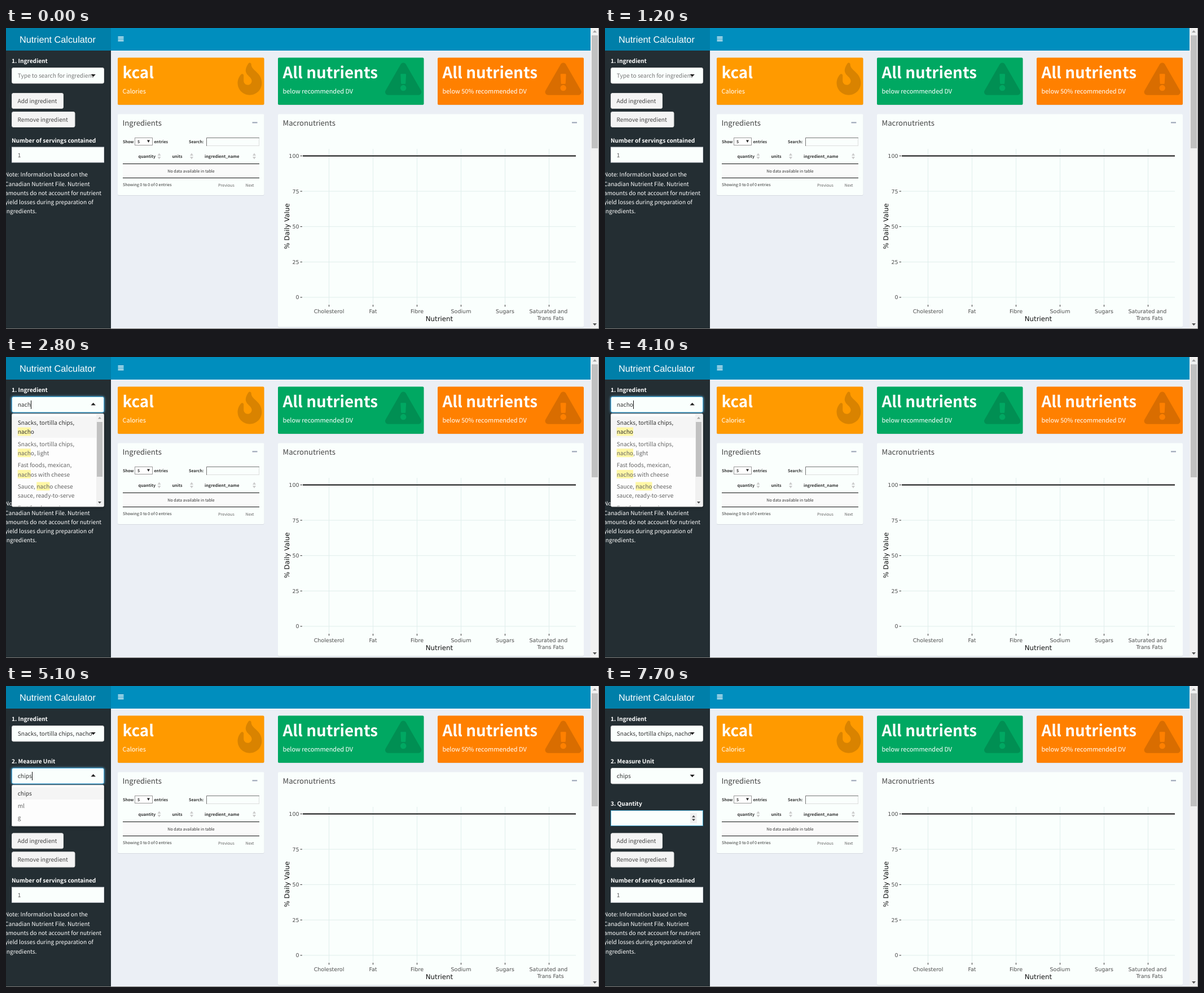
These frames come from a looping animation (1051x533 px, 8 s). An HTML page:

```html
<!DOCTYPE html>
<html lang="en">
<head>
<meta charset="utf-8">
<title>Nutrient Calculator</title>
<style>
  html, body { margin: 0; width: 100%; height: 100%; overflow: hidden; background: #ebeff5; }
  svg { display: block; width: 1051px; height: 533px; }
  text {
    font-family: "Noto Sans CJK SC", "Noto Sans CJK JP", "Noto Sans CJK", Lato, sans-serif;
    white-space: pre; text-rendering: geometricPrecision;
  }
  .plot { font-family: "DejaVu Sans", sans-serif; }
  .brand { font-family: "Liberation Sans", Arial, sans-serif; }
  .glow { filter: drop-shadow(0 0 2px #5bb8e8); }
  .drop { filter: drop-shadow(0 2px 2px rgba(0, 0, 0, .3)); }
</style>
</head>
<body>
<svg id="stage" viewBox="0 0 1051 533">
  <defs>
    <clipPath id="field"><rect x="11" y="60" width="146.500" height="130"/></clipPath>
    <clipPath id="menu"><rect x="10" y="100" width="150" height="164.500"/></clipPath>
  </defs>
  <g id="page"></g>
  <g id="side"></g>
</svg>
<script>
const LOOP = 8000;
const BODY = 10.15;   // sidebar text size
const SMALL = 7.1;    // table text size
const FACE = '"Noto Sans CJK SC", "Noto Sans CJK JP", "Noto Sans CJK", Lato, sans-serif';
const WHITE = '#fafffd';

const pen = document.createElement('canvas').getContext('2d');
pen.font = `${BODY}px ${FACE}`;
pen.textRendering = 'geometricPrecision';
const widthOf = s => pen.measureText(s).width;

const rect = (x, y, w, h, fill, more = '') =>
  `<rect x="${x}" y="${y}" width="${w}" height="${h}" fill="${fill}" ${more}/>`;
const text = (x, y, s, size, fill, more = '') =>
  `<text x="${x}" y="${y}" font-size="${size}" fill="${fill}" ${more}>${s}</text>`;
const line = (x1, y1, x2, y2, stroke, w = 1) =>
  `<path d="M${x1} ${y1}L${x2} ${y2}" stroke="${stroke}" stroke-width="${w}"/>`;
// Triangle centred on x; h < 0 points up from y.
const tri = (x, y, half, h, fill) =>
  `<path d="M${x - half} ${y}h${2 * half}L${x} ${y + h}z" fill="${fill}"/>`;
const BOLD = 'font-weight="700"';
const MID = 'text-anchor="middle"';

const FIRE = 'M216 23.860c0-23.800-30.650-32.770-44.150-13.040C48 191.850 224 200 224 288c0 35.630-29.110 64.460-64.850 64-35.170-.450-63.150-29.770-63.150-65v-85.500c0-21.700-26.470-32.230-41.430-16.500C27.800 213.160 0 261.330 0 320c0 105.870 86.130 192 192 192s192-86.130 192-192c0-170.290-168-193-168-296.140z';
const ALERT = 'M569.500 440C588 472 564.800 512 528 512H48c-37 0-60-40-41.500-72L246.400 24c18.500-32 64.700-32 83.200 0zM288 354c-25.400 0-46 20.600-46 46s20.600 46 46 46 46-20.600 46-46-20.600-46-46-46zm-43.700-165.300l7.400 136c.400 6.300 5.600 11.300 12 11.300h48.600c6.400 0 11.600-5 12-11.300l7.400-136c.400-6.900-5.100-12.700-12-12.700h-63.400c-6.900 0-12.400 5.800-12 12.700z';

function valueBox(x, w, fill, title, note, icon, iconX) {
  return rect(x, 53, w, 83.500, 'rgba(0,0,0,.12)', 'rx="2"') + rect(x, 52.500, w, 83.500, fill, 'rx="2"') +
    `<path d="${icon}" transform="translate(${iconX} 61.500) scale(.1118)" fill-opacity=".15"/>` +
    text(x + 8.500, 89, title, 27.800, '#fff', BOLD) +
    text(x + 8.500, 115.500, note, 10.950, '#fff');
}

function panel(x, w, h, title) {
  return rect(x, 153.500, w, h, '#d6dbe1', 'rx="2"') + rect(x, 152.500, w, h, WHITE, 'rx="2"') +
    text(x + 8.500, 173, title, 13.100, '#444') +
    rect(x + w - 21, 166.500, 9, 2, '#97a0b3');
}

function table() {
  const head = [['quantity', 234.500, 271.500], ['units', 294.500, 329], ['ingredient_name', 352, 440]];
  const small = (x, y, s, more) => text(x, y, s, SMALL, '#333', more);
  return small(207, 203.500, 'Show', BOLD) + small(262.500, 203.500, 'entries', BOLD) +
    rect(228.500, 194.500, 31, 13, '#fff', 'stroke="#999"') +
    small(233, 203.700, '5', BOLD) + tri(252.500, 198.500, 2.500, 4.500, '#222') +
    small(324, 204, 'Search:', BOLD) +
    rect(355.500, 194.500, 93, 14, WHITE, 'stroke="#ddd"') +
    `<path d="M355.500 209V194.500H449" fill="none" stroke="#777"/>` +
    head.map(([s, x, mark]) => text(x, 229.500, s, 7.250, '#333', BOLD) +
      tri(mark, 226, 3, -4.500, '#ccc') + tri(mark, 228, 3, 4.500, '#ccc')).join('') +
    rect(207, 241, 242, 24, '#fafafa') +
    line(207, 240.500, 449, 240.500, '#111') + line(207, 265.500, 449, 265.500, '#111') +
    small(328, 256, 'No data available in table', MID) +
    small(207, 279.500, 'Showing 0 to 0 of 0 entries') +
    text(376, 280.500, 'Previous', SMALL, '#666') + text(424.500, 280.500, 'Next', SMALL, '#666');
}

function chart() {
  const names = ['Cholesterol', 'Fat', 'Fibre', 'Sodium', 'Sugars', 'Saturated and'];
  let out = '';
  const label = (x, y, s, more) => text(x, y, s, 9.500, '#4d4d4d', `class="plot" ${more}`);
  for (let i = 0; i < 5; i++) {
    const y = 226.500 + i * 62.600;
    out += line(526, y, 1010, y, '#e0eeec') + line(521.500, y, 525, y, '#333') +
      label(519.500, y + 3.500, 100 - 25 * i, 'text-anchor="end"');
  }
  names.forEach((s, i) => {
    const x = 572.500 + 78 * i;
    out += line(x, 214, x, 489, '#e0eeec') + line(x, 490, x, 493.500, '#333') +
      label(i === 5 ? 961.500 : x, 505, s, MID);
  });
  return out + label(965, 517, 'Trans Fats', MID) + line(526, 226.500, 1010, 226.500, '#111', 2) +
    text(768, 519, 'Nutrient', 11.800, '#111', `class="plot" ${MID}`) +
    text(0, 0, '% Daily Value', 11.800, '#111', `class="plot" ${MID} transform="translate(502 351) rotate(-90)"`);
}

function page() {
  return rect(0, 0, 1051, 533, '#ebeff5') + rect(186, 0, 850, 40, '#008ebe') +
    [16, 19.200, 22.400].map(y => rect(198.500, y - .7, 10, 1.700, '#fff')).join('') +
    valueBox(198, 259.500, '#ff9a00', 'kcal', 'Calories', FIRE, 410.500) +
    valueBox(482, 258.500, '#00a862', 'All nutrients', 'below recommended DV', ALERT, 672) +
    valueBox(765, 259, '#ff8000', 'All nutrients', 'below 50% recommended DV', ALERT, 955.500) +
    panel(198, 259.500, 143.500, 'Ingredients') + table() +
    panel(482, 542, 377, 'Macronutrients') + chart() +
    rect(1036, 0, 15, 533, '#f1f1f1') + rect(1038, 13, 11, 200, '#c1c1c1') +
    tri(1043.500, 8, 3.500, -4, '#a3a3a3') + tri(1043.500, 523, 3.500, 4, '#505050') +
    rect(1050, 0, 1, 533, '#9a9a9a') + rect(0, 532, 1051, 1, '#7d7b78');
}

const FOODS = [['Cheese souffle'], ['Chop suey, with meat,', 'canned'],
  ['Chinese dish, chow mein,', 'chicken'], ['Corn fritter'],
  ['Beef pot roast, with', 'browned potatoes, peas', 'and gravy']];
const MATCHES = [['Snacks, tortilla chips,', 'nacho'], ['Snacks, tortilla chips,', 'nacho, light'],
  ['Fast foods, mexican,', 'nachos with cheese'], ['Sauce, nacho cheese', 'sauce, ready-to-serve'],
  ['Fast foods, mexican,', 'nachos with cheese']];
const NOTE = ['Note: Information based on the', 'Canadian Nutrient File. Nutrient',
  'amounts do not account for nutrient', 'yield losses during preparation of', 'ingredients.'];
const HINT = 'Type to search for ingredient';
const CHOICE = 'Snacks, tortilla chips, nacho';

const label = (y, s) => text(10, y, s, BODY, '#fff', BOLD);
const caretBar = (s, y) => rect(Math.round(20.400 + widthOf(s)), y, 1, 15, '#111');

function button(y, s, w, hot) {
  return rect(10.500, y + .5, w, 27, hot ? '#e7e7e7' : '#f4f4f4', `rx="2.500" stroke="${hot ? '#adadad' : '#ddd'}"`) +
    text(20.500, y + 18, s, BODY, '#444');
}

function picker(y, s, open, hint) {
  const frame = open ? 'class="glow" stroke="#4aaee0"' : 'stroke="#ddd"';
  return rect(10.500, y + .5, 163, 27.500, WHITE, `rx="2.500" ${frame}`) +
    `<g clip-path="url(#field)">${text(20.700, y + 18, s, BODY, hint ? '#777' : '#333')}</g>` +
    (open ? tri(154.700, y + 15.500, 4.200, -4.500, '#222') : tri(154.700, y + 12, 4.200, 4.500, '#222'));
}

function marks(s, query, y) {
  let out = '';
  if (query.length < 2) return out;
  for (let at = s.indexOf(query); at >= 0; at = s.indexOf(query, at + 1))
    out += rect(20.700 + widthOf(s.slice(0, at)), y - 11.500, widthOf(query), 15, '#fff7a5');
  return out;
}

function foodMenu(query) {
  const found = query.length > 1;
  let y = 105.200, items = '';
  (found ? MATCHES : FOODS).forEach((rows, i) => {
    const h = 5.100 + 16.300 * rows.length;
    if (!i) items += rect(11, y, 149, h, '#f5f5f5');
    rows.forEach((s, n) => {
      const base = y + 14.600 + 16.300 * n;
      items += marks(s, query, base) + text(20.700, base, s, BODY, i ? '#666' : '#333');
    });
    y += h;
  });
  return rect(10.500, 100.500, 163, 164.500, '#fdfdfd', 'rx="2" stroke="#d0d0d0" class="drop"') +
    `<g clip-path="url(#menu)">${items}</g>` +
    rect(160, 101, 13, 164, '#f1f1f1') + rect(161, 115, 10, found ? 97 : 14, '#c1c1c1') +
    tri(166, 109.500, 3, -3.500, '#a3a3a3') + tri(166, 256, 3, 3.500, '#505050');
}

function unitMenu(active) {
  return rect(10.500, 175.500, 163, 72.500, '#fdfdfd', 'rx="2" stroke="#d0d0d0" class="drop"') +
    ['chips', 'ml', 'g'].map((s, i) => {
      const on = i === active, y = 179.500 + 21.500 * i;
      return (on ? rect(11, y, 162, 21.500, '#f5f5f5') : '') + text(20.700, y + 14.500, s, BODY, on ? '#333' : '#666');
    }).join('');
}

function mix(k) {
  const a = [210, 214, 222], b = [60, 160, 200];
  return `rgb(${a.map((v, i) => Math.round(v + (b[i] - v) * k))})`;
}

function quantity({ focus = 0, spin, value = '1', caret }) {
  return label(211.700, '3. Quantity') +
    rect(10.500, 220.500, 163, 27, WHITE, `stroke="${mix(focus)}"`) +
    text(20.700, 238.300, value, BODY, '#555') +
    (focus && caret ? rect(26, 226, 1, 15, '#111') : '') +
    (spin ? rect(151, 225, 12, 18, '#f0f0f0') + tri(157, 232.500, 3, -3.500, '#444') + tri(157, 235.500, 3, 3.500, '#444') : '');
}

function sidebar(v) {
  const dy = v.picked ? 145.300 : 0, searching = v.query !== undefined, choosing = v.unit !== undefined;
  let out = rect(0, 40, 186, 492, '#242e33') + rect(0, 0, 186, 40, '#007fa9') +
    text(24, 25.500, 'Nutrient Calculator', 16.300, '#fff', 'class="brand"') +
    label(62, '1. Ingredient') +
    picker(70, v.picked ? CHOICE : v.query || HINT, searching, !v.picked && !v.query);
  if (v.picked)
    out += label(137, '2. Measure Unit') + picker(145, 'chips', choosing) + quantity(v);
  out += `<g transform="translate(0 ${dy})">` +
    button(115, 'Add ingredient', 91, v.hover === 'add') +
    button(148, 'Remove ingredient', 111.500, v.hover === 'remove') +
    label(202.500, 'Number of servings contained') +
    rect(10.500, 211, 163, 27, WHITE, 'stroke="#d2d6de"') + text(20.700, 228.800, '1', BODY, '#555') +
    NOTE.map((s, i) => text(-2, 263.200 + 16.300 * i, s, BODY, '#fff')).join('') + '</g>';
  if (searching) out += foodMenu(v.query) + (v.caret ? caretBar(v.query, 77) : '');
  if (choosing) out += unitMenu(v.unit) + (v.caret ? caretBar('chips', 152) : '');
  return out;
}

const search = (query, caret = true) => ({ query, caret });
const units = (unit, caret) => ({ picked: true, unit, caret });
const amount = (more = {}) => ({ picked: true, ...more });
const STEPS = [
  [0, {}], [600, { hover: 'remove' }], [700, {}], [800, { hover: 'add' }], [900, {}],
  [1600, search('')], [2000, search('', false)], [2400, search('n')],
  [2600, search('na')], [2700, search('nac')], [2800, search('nach')], [2900, search('nacho')],
  [3400, search('nacho', false)], [4100, search('nacho')],
  [4400, amount()], [5100, units(0, true)], [5500, units(0, false)],
  [5700, units(2, false)], [6000, units(2, true)], [6200, units(1, true)], [6300, units(0, true)],
  [6500, units(0, false)], [6600, amount()], [6800, amount({ spin: true })],
  [7100, amount({ spin: true, focus: .35, caret: true })],
  [7200, amount({ spin: true, focus: .7, caret: true })],
  [7300, amount({ spin: true, focus: 1, caret: true })],
  [7600, amount({ spin: true, focus: 1 })],
  [7700, amount({ spin: true, focus: 1, value: '' })]
];

const side = document.getElementById('side');
document.getElementById('page').innerHTML = page();
let shown = null;

function tick() {
  const t = performance.now() % LOOP;
  const view = STEPS.findLast(([at]) => at <= t)[1];
  if (view !== shown) {
    side.innerHTML = sidebar(view);
    shown = view;
  }
  requestAnimationFrame(tick);
}
tick();
</script>
</body>
</html>
```
